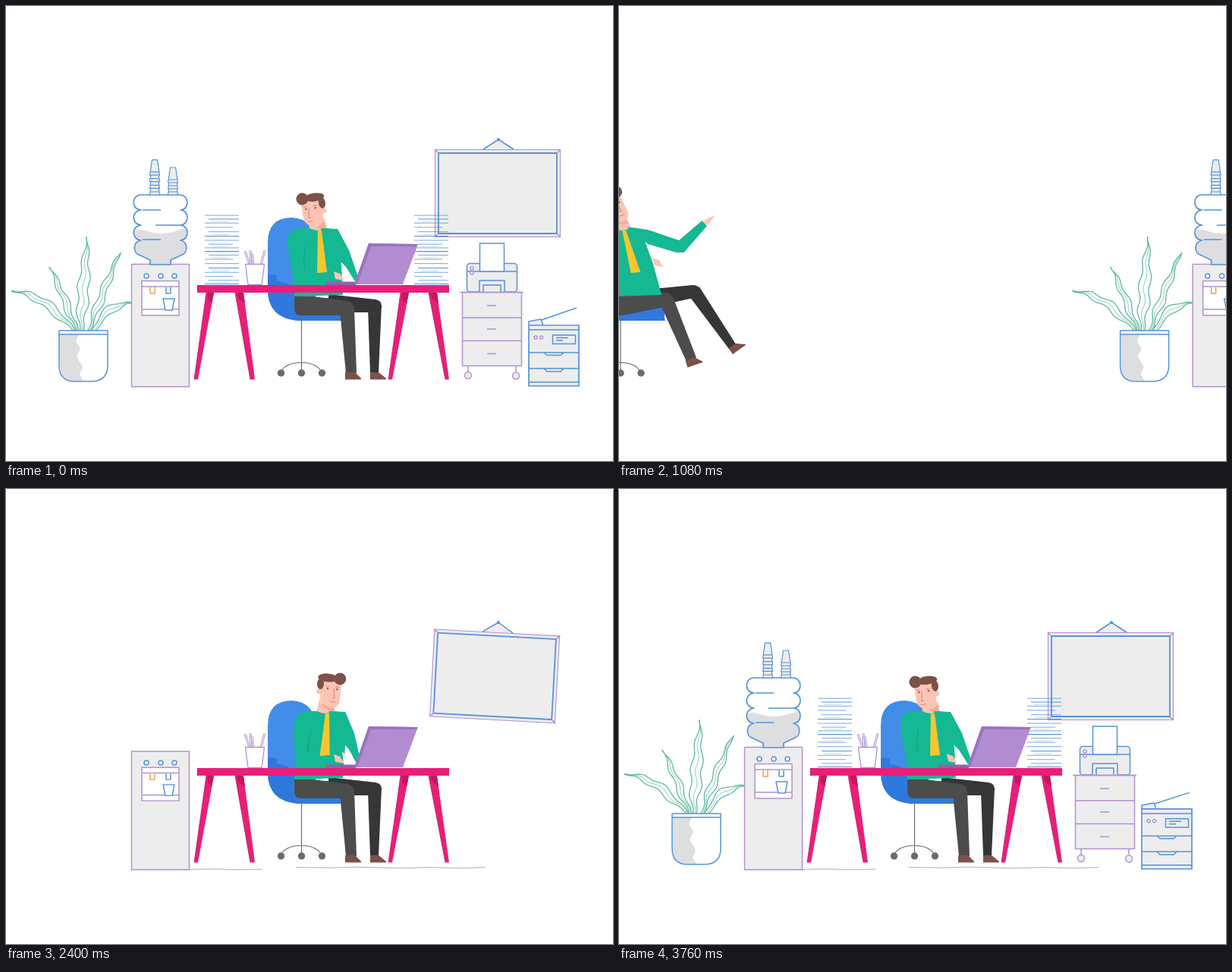
Write an HTML page with a canvas that moves like this. It is 800 px wide and 600 px high and loops after 3800 ms.

```html
<!DOCTYPE html>
<html lang="en">
<head>
<meta charset="utf-8">
<title>Office</title>
<style>
html, body { margin: 0; width: 100%; height: 100%; overflow: hidden; background: #fff; }
canvas { display: block; }
</style>
</head>
<body>
<canvas id="stage" width="800" height="600"></canvas>
<script>
const c = document.getElementById('stage').getContext('2d');
const LOOP = 3800;
const BLUE = '#5693d8', PURPLE = '#b391cf', PINK = '#e81f79', DARK_PINK = '#c4175f', GREY = '#ededee',
  GREEN = '#14b892', SKIN = '#fdc4b5', SHADE = '#f9a994', HAIR = '#7d5148', LEAF = '#5dba98';

const clamp = v => Math.max(0, Math.min(1, v));
const lerp = (a, b, p) => a + (b - a) * p;
const part = (t, a, b) => clamp((t - a) / (b - a));
const easeOut = p => 1 - (1 - p) ** 3;
const back = p => 1 + 2.2 * (p - 1) ** 3 + 1.2 * (p - 1) ** 2;
const pop = (t, a, b) => back(part(t, a, b));

// Smooth interpolation through time, value pairs.
function key(t, ...k) {
  if (t <= k[0]) return k[1];
  for (let i = 2; i < k.length; i += 2) if (t < k[i]) {
    const p = part(t, k[i - 2], k[i]);
    return lerp(k[i - 1], k[i + 1], p * p * (3 - 2 * p));
  }
  return k[k.length - 1];
}
function paint(path, fill, line, w = 1.5) {
  if (fill) { c.fillStyle = fill; c.fill(path); }
  if (line) { c.strokeStyle = line; c.lineWidth = w; c.stroke(path); }
}
const shape = (d, fill, line, w) => paint(new Path2D(d), fill, line, w);
function dot(x, y, r, fill, line, ry = r) {
  const p = new Path2D();
  p.ellipse(x, y, r, ry, 0, 0, 7);
  paint(p, fill, line);
}
function box(x, y, w, h, fill, line, lw, r = 0) {
  const p = new Path2D();
  p.roundRect(x, y, w, h, r);
  paint(p, fill, line, lw);
}
function poly(pts, fill) {
  shape('M' + pts.map(p => p.join()).join('L') + 'Z', fill);
}
// Draw with scale and rotation (degrees) around a pivot, then a shift.
function around(x, y, { sx = 1, sy = 1, rot = 0, dx = 0, dy = 0 }, draw) {
  c.save();
  c.translate(x + dx, y + dy);
  c.rotate(rot * Math.PI / 180);
  c.scale(sx, sy);
  c.translate(-x, -y);
  draw();
  c.restore();
}
// Draw sheared sideways by dx at shoulder height, fixed at the hip.
function leaning(dx, draw) {
  c.save();
  c.transform(1, 0, -dx / 90, 1, dx * 383 / 90, 0);
  draw();
  c.restore();
}

function leaf(x0, y0, x1, y1, w) {
  const len = Math.hypot(x1 - x0, y1 - y0), nx = (y0 - y1) / len, ny = (x1 - x0) / len;
  const arch = 17 * ((x1 - x0) / len) ** 2;
  const edge = side => Array.from({ length: 31 }, (_, i) => {
    const u = i / 30, hump = Math.sin(Math.PI * u);
    const o = side * w * Math.sin(Math.PI * u ** .8) + 2.2 * Math.sin(u * len / 5.5 + side * .5) * (1 - u * .4);
    return [lerp(x0, x1, u) + nx * o, lerp(y0, y1, u) + ny * o - arch * hump];
  });
  const line = pts => 'M' + pts.map(p => p.join()).join('L');
  shape(line([...edge(1), ...edge(-1).reverse()]) + 'Z', '#fff', LEAF, 1.3);
  shape(line(edge(0)), null, LEAF, .7);
}

function plant(t) {
  if (t < 3400) return;
  const g = pop(t, 3480, 3740);
  around(102, 430, { sx: g, sy: g }, () => {
    leaf(94, 430, 58, 344, 4);
    leaf(108, 430, 150, 325, 4.5);
    leaf(91, 430, 8, 375, 5);
    leaf(112, 430, 166, 392, 5);
    leaf(98, 432, 107, 305, 7);
  });
  around(102, 495, { sy: pop(t, 3400, 3600) }, () => {
    const pot = 'M70 428H134V474Q134 495 112 495H91Q70 495 70 474Z';
    shape(pot, '#fff');
    shape('M71 433H96L92 442L98 452L93 462L101 476L97 486L102 494H91Q71 494 71 474Z', '#dedee0');
    shape(pot + 'M70 433H134', null, BLUE);
  });
}

function cups(x, y, w, n, gap) {
  for (let i = 0; i < n; i++) {
    const b = y - i * gap;
    shape(`M${x - w} ${b}L${x - w + 3} ${b - 20}H${x + w - 3}L${x + w} ${b}ZM${x - w + .6} ${b - 4}H${x + w - .6}`, GREY, BLUE, 1.2);
  }
}

function cooler(t) {
  if (t < 2200) return;
  const body = key(t, 2200, 0, 2440, 1.04, 2600, .98, 2840, .985, 3000, 1);
  around(204, 502, { sy: body }, () => {
    box(165.5, 340.5, 76, 161.5, GREY, PURPLE);
    for (const x of [185, 204, 222]) dot(x, 356, 3, '#fff', BLUE);
    box(179, 362.5, 49, 45.5, '#fff', PURPLE);
    shape('M179 370H228M179 400H228', null, PURPLE);
    shape('M190 371V379H196V371', '#fff', '#f0a04b');
    shape('M211 371V379H217V371', '#fff', BLUE);
    shape('M207 386H222L219 401H210Z', '#fff', BLUE);
  });
  if (t < 2440) return;
  const squash = key(t, 2600, 1, 2840, .9, 3000, 1.02, 3150, 1);
  const fall = -240 * (1 - part(t, 2440, 2640) ** 2);
  around(204, 341, { sy: squash, dy: fall }, () => {
    const d = 'M178 249H229C242 249 242 269 230 269C242 270 242 288 230 289C242 290 242 308 230 309' +
      'C240 311 240 325 232 328L217 335V341H190V335L175 328C167 325 167 311 178 309' +
      'C165 308 165 290 178 289C165 288 165 270 178 269C165 269 165 249 178 249Z';
    shape(d, '#fff');
    c.save();
    c.clip(new Path2D(d));
    shape('M165 297Q176 293 186 297T207 300T225 296T242 295V342H165Z', '#dedee0');
    c.restore();
    shape(d + 'M180 269H204M197 289H230M180 308H204', null, BLUE, 1.7);
  });
  if (t < 2640) return;
  const y = 341 - 92 * squash, drop = -150 * (1 - part(t, 2640, 2800) ** 2);
  cups(196, y + drop, 6.5, 4, key(t, 2840, 19, 3040, 8.7));
  cups(220, y + drop, 6.5, 3, 8);
}

function board(t) {
  if (t < 1720) return;
  const s = t - 2000;
  const rot = -5.5 * Math.exp(-.0014 * s) * Math.cos(s * Math.PI * 2 / 840) * (1 - part(t, 2840, 3700));
  const drawn = part(t, 1720, 2040), filled = part(t, 2040, 2240);
  // Frame lines grow from the top middle towards the lower left.
  const trim = (d, total, line, w) => {
    c.save();
    if (drawn < 1) c.setLineDash([total * drawn, total]);
    shape(d, null, line, w);
    c.restore();
  };
  around(649, 176, { rot }, () => {
    c.globalAlpha = filled;
    shape('M649 176L629 189H669Z', GREY);
    box(565.5, 189.5, 165, 115, '#ebebf4');
    box(570, 194, 156, 106, GREY);
    c.globalAlpha = 1;
    shape('M629 189L649 176L669 189', null, BLUE);
    dot(649, 176, 2, BLUE);
    trim('M649 189.5H565.5V304.5', 230, PURPLE, 1.1);
    trim('M649 189.5H730.5V304.5H565.5', 395, PURPLE, 1.1);
    trim('M649 194H570V300', 205, BLUE, 1.8);
    trim('M649 194H726V300H570', 370, BLUE, 1.8);
    if (drawn === 1) shape('M565 189L570 194M731 189L726 194M565 305L570 300M731 305L726 300', null, PURPLE);
  });
}

function stack(t, x, start) {
  for (let i = 0; i < 18; i++) {
    const dt = t - start - i * 5.7;
    if (dt < 0) continue;
    const rest = 366.5 - i * 5.3 + Math.sin(i * 7) * .8;
    const y = Math.min(rest, 101 + (17 - i) * .3 + .0047 * dt * dt);
    const a = i % 3 === 1 ? 5 : 0, b = i % 4 === 2 ? 8 : 0;
    shape(`M${x + a} ${y}H${x + 45 - b}`, null, BLUE, i % 4 ? .8 : 1.2);
    if (y === rest && i % 3 === 0) shape(`M${x + 9} ${y - 2}H${x + 32}`, null, '#a9caee', .7);
  }
}

function cabinet(t) {
  if (t < 2900) return;
  const dx = 210 * (1 - easeOut(part(t, 2900, 3300)));
  around(640, 377, { dx }, () => {
    if (t > 3180) around(640, 377, { dy: -190 * (1 - part(t, 3180, 3380) ** 2) }, () => {
      box(607.5, 339.5, 66, 37.5, GREY, BLUE, 1.5, 4);
      shape('M607 350H674', null, BLUE);
      const up = pop(t, 3400, 3600);
      box(624.5, 350 - 37 * up, 32, 37 * up, '#fff', BLUE);
      shape('M624 377V362H657V377M629 377V368H652V377', GREY, BLUE);
      dot(614, 346, 2, '#fff', PURPLE);
      dot(614, 352, 2, '#fff', PURPLE);
    });
    box(601.5, 377.5, 78, 97, GREY, PURPLE);
    shape('M598 377.5H682M601 411H680M601 441.5H680M634 395H646M634 426H646M634 458.5H646M609 475V482M672 475V482', null, PURPLE);
    dot(609, 487, 4.5, GREY, PURPLE);
    dot(672, 487.5, 4.5, GREY, PURPLE);
  });
}

function copier(t) {
  if (t < 3400) return;
  around(722, 501, { sy: key(t, 3400, 0, 3620, 1.04, 3760, .988, 3800, 1) }, () => {
    shape('M689 421V416L705 413L708 421', GREY, BLUE);
    shape(`M706 414L752 ${key(t, 3560, 414, 3800, 398)}`, null, BLUE);
    box(689, 421, 66, 80, GREY, BLUE, 1.7);
    shape('M689 427H755M689 457H755M689 478H755M689 496H755M709 457L713 460.5H731L735 457M709 478L713 482H731L735 478', null, BLUE);
    box(720.5, 434, 30, 11.5, GREY, BLUE);
    shape('M725 437.5H741M725 441H734', null, BLUE);
    dot(698, 437, 2, '#fff', PURPLE);
    dot(705.5, 437, 2, '#fff', PURPLE);
  });
}

function head(t) {
  const m = key(t, 1440, 1, 3300, 1, 3600, -1, 4200, -1, 4450, 1);
  shape('M-10 -16H11L12 2Q0 12 -12 2Z', SKIN);
  shape('M-8 -11H10L11 -1Q3 -3 -8 -11Z', SHADE);
  dot(-11 * m, -27, 3.5, SKIN);
  c.save();
  c.translate(4 * m, 0);
  shape('M-13.5 -44H13.5L13 -16Q12 -8 4 -7Q-8 -7 -13 -18Z', SKIN);
  c.translate(2 * m, 0);
  dot(-6, -32, 1.2, HAIR);
  dot(6.5, -32, 1.2, HAIR);
  c.scale(m < 0 ? -1 : 1, 1);
  shape('M2 -33L4 -20H1M-1 -15H6M-9 -35H-4M4 -35H9', null, '#dd8372', 1);
  c.restore();
  dot(-10 * m, -37.5, 4.5, HAIR, null, 7.5);
  dot(-m, -46, 13, HAIR, null, 5.5);
  dot(15 * m, -46, 8, HAIR);
}

function leg(hip, knee, swing, bend, thigh, shin, shoe, color) {
  around(...hip, { rot: swing }, () => {
    shape(thigh, color);
    around(...knee, { rot: bend }, () => {
      shape(shin, color);
      shape(shoe, HAIR);
    });
  });
}

const REST_ARM = [[415, 293], [437, 294], [452, 322], [464, 357], [460, 363], [448, 344], [441, 337], [425, 330]];
const RAISED_ARM = [[418, 291], [445, 295], [483, 309], [519, 283], [524, 290], [486, 325], [476, 325], [441, 314]];

function worker(t) {
  const flung = key(t, 1000, 1, 1440, 1, 1760, 0);
  const lean = key(t, 1440, -20, 1760, -8, 2000, -4, 2500, 12, 2840, 15, 3250, 12, 3700, 0, 3800, 0, 4200, 4, 4560, 10);
  const tilt = key(t, 1440, -27, 1760, -6, 2000, 0, 2840, 11, 3250, 9, 3700, -8, 3800, -8, 4200, -4, 4560, 11);
  const drop = key(t, 1440, 0, 2000, 0, 2840, 4, 3760, 5, 4200, 4, 4560, 0);
  const left = (1667 - Math.min(t, 1667)) / 540;
  c.save();
  c.translate(-329 * left * left, 0);

  // Chair
  if (t > 1300 && t < 1600) box(366, 415, 23, 59, '#ececec');
  shape('M389.5 415V484M362 484Q366 471 389 470Q412 471 416 484', null, '#6b6b6b', 1.2);
  for (const x of [362.5, 389.5, 416.5]) dot(x, 484, 4.7, '#6b6b6b');
  leaning(-8 * flung, () => {
    shape('M345 312Q345 279 377 279Q408 281 408 315V385H445V415H384Q345 411 345 374Z', '#418de8');
    shape('M345 354L357 355V362L371 366L382 372L396 385H445V415H384Q345 411 345 374Z', '#3079dc');
  });

  leg([395, 390], [487, 392], -12 * flung, -23 * flung,
    'M425 380L487 387Q495 388 495 396L492 404H425Z', 'M477 398L495 394L491 484H480Z',
    'M480 483H491L501 491V492.5H480Z', '#343638');
  leg([390, 395], [450, 394], -11 * flung, -8 * flung,
    'M380 383H405L450 389Q459 391 459 400L455 408H389Q380 408 380 398Z', 'M440 402L459 398L462 484H448Z',
    'M447 483H460L468 491V492.5H447Z', '#4c4c4c');

  c.save();
  c.translate(411 + lean, 293);
  c.rotate(tilt * Math.PI / 180);
  c.translate(0, drop);
  head(t);
  c.restore();

  leaning(lean, () => {
    shape('M400 293Q380 292 375 298Q370 304 372 320L380 368V383L444 381L442 340L436 298Q430 293 421 293Q411 299 400 293Z', GREEN);
    shape('M395 318Q391 335 394 347', null, '#0e9d80', 1);
    shape('M411 296H416L423 351L410 352Z', '#f7c62f');
    if (flung > .1) shape('M520 285Q528 278 537 277L525 289Z', SKIN);
    poly(REST_ARM.map((p, i) => p.map((v, j) => lerp(v, RAISED_ARM[i][j], flung))), GREEN);
  });

  const y = lerp(356 + Math.sin(t / 55), 338, flung);
  shape(`M432 ${y - 6}L440 ${y - 3}L446 ${y + 6}L434 ${y + 4}Z`, SKIN);
  if (!flung) shape('M443 346L457 362H445Z', '#fff');
  c.restore();
}

function desk(t) {
  if (t < 1200) return;
  const h = key(t, 1200, 126, 1440, 65, 1640, 10), s = clamp((65 - h) / 55), y = 368 + h;
  around(418, 368, { sx: easeOut(part(t, 1200, 1320)) }, () => {
    const legs = [[268, 275, 270, 275, 264, 274, 248, 253], [301, 309, 301, 306, 302, 313, 322, 328],
      [524, 532, 526, 531, 520, 531, 504, 509], [557, 565, 558, 562, 557, 568, 579, 584]];
    for (const l of legs) {
      const [a, b, d, e] = [0, 1, 2, 3].map(i => lerp(l[i], l[i + 4], s));
      const foot = lerp(495, 492.5, s);
      poly([[a, y], [b, y], [e, foot], [d, foot]], PINK);
      if (s > .5) {
        poly([[a + 2, y], [b, y], [lerp(b, e, .13), y + 14], [lerp(a, d, .08) + 3, y + 9]], DARK_PINK);
        shape(`M${a} ${y}L${d} ${foot}`, null, DARK_PINK, .8);
      }
    }
    box(252, 368, 332, h, PINK);
    shape(`M252.5 368V${y}`, null, DARK_PINK, 1);
  });
}

function laptop(t) {
  if (t < 1760) return;
  const dx = key(t, 1760, -40, 2000, 10, 2240, 19), h = key(t, 1760, 0, 2000, 47, 2240, 54);
  const x = 459 + dx, y = 367 - h;
  shape('M421 363.5H461V368H421Z', '#8d62b0');
  poly([[459, 367], [x, y], [x + 65, y + 1], [523, 367]], '#b28cd0');
  shape(`M459 367L${x} ${y}L${x + 65} ${y + 1}L${x + 62} ${y + 4}H${x + 3}L463 367Z`, '#9c73bf');
}

function pencilCup(t) {
  if (t < 1700) return;
  [[320, 341, 314, 323], [322, 341, 321, 322], [325, 341, 323, 326], [335, 341, 340, 322]].forEach(([a, b, d, e], i) => {
    const start = 1740 + i * 35;
    if (t < start) return;
    const dy = -187 * (1 - part(t, start, start + 220) ** 2) - (i % 2 ? 10 * Math.sin(Math.PI * part(t, start + 150, 2300)) : 0);
    shape(`M${a} ${b + dy}L${d} ${e + dy}M${a + 2} ${b + dy}L${d + 2} ${e + dy}`, null, PURPLE, 1);
  });
  around(328, 367, { sy: pop(t, 1700, 1860) }, () => shape('M315.5 340.5H340.5L337 367.5H319Z', '#fff', PURPLE, 1.3));
}

function scene(t) {
  c.save();
  c.translate(165 * (Math.max(0, t - 3954) / 606) ** 3, 0);
  if (t > 1700 && (t < 3800 || t > 4350))
    shape('M235 502L270 501L300 502L338 501.5M382 499L430 499.5L460 498.5L520 500L560 499L600 500L632 499', null, '#c8c8c8', 1.4);
  plant(t);
  cooler(t);
  board(t);
  stack(t, 262, 3300);
  stack(t, 538, 2640);
  cabinet(t);
  copier(t);
  pencilCup(t);
  worker(t);
  desk(t);
  laptop(t);
  c.restore();
}

function frame(now) {
  const t = now % LOOP;
  c.fillStyle = '#fff';
  c.fillRect(0, 0, 800, 600);
  c.lineJoin = 'round';
  // The finished office rolls out while the next one is being built.
  if (t < 1240) scene(t + LOOP);
  if (t >= 1000) scene(t);
  requestAnimationFrame(frame);
}
requestAnimationFrame(frame);
</script>
</body>
</html>
```
